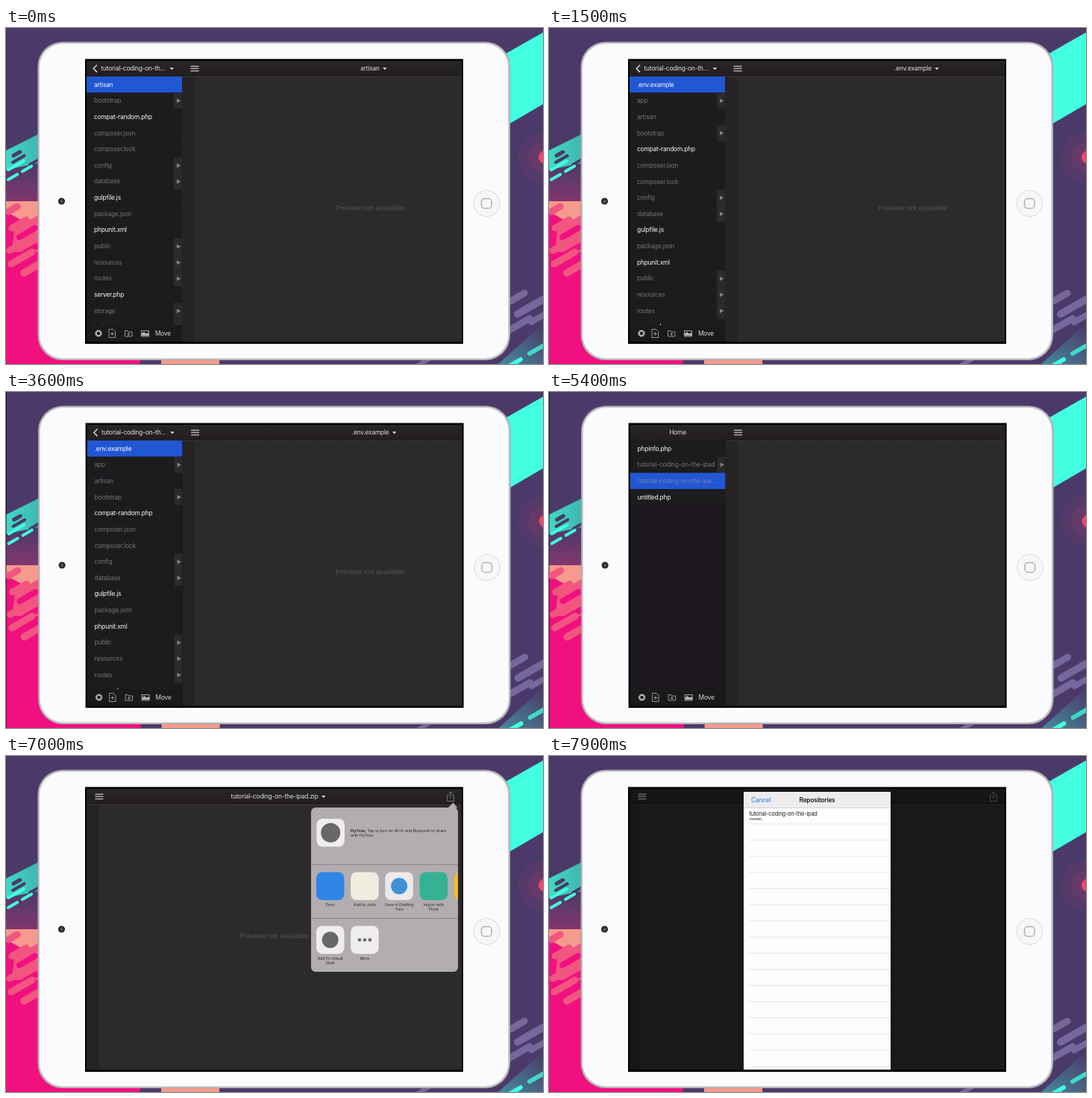
Write an HTML page that moves like this. It is 720 by 450 pixels and loops after 8000 ms.

```html
<!DOCTYPE html>
<html lang="en">
<head>
<meta charset="utf-8">
<title>Tablet file manager</title>
<style>
html, body { margin: 0; width: 100%; height: 100%; overflow: hidden; background: #000; }
svg { display: block; width: 720px; height: 450px; }
text { font-family: Inter, "Noto Sans", sans-serif; font-size: 8.37px; letter-spacing: -.2px; white-space: pre; }
.plain { font-family: "Liberation Sans", Arial, sans-serif; font-size: 9.8px; letter-spacing: 0; }
.tiny { font-size: 5.2px; letter-spacing: 0; }
.mid { text-anchor: middle; }
</style>
</head>
<body>
<svg id="svg" viewBox="0 0 720 450" xmlns="http://www.w3.org/2000/svg">
  <defs>
    <clipPath id="screen"><rect x="108" y="44" width="503" height="376"/></clipPath>
    <clipPath id="list"><rect x="108" y="65" width="128" height="333"/></clipPath>
    <clipPath id="share"><rect x="409" y="69" width="197" height="220" rx="6"/></clipPath>
    <linearGradient id="dusk" x1="0" y1="0" x2="0" y2="1">
      <stop offset="0" stop-color="#4b3a69"/><stop offset="1" stop-color="#84366f"/>
    </linearGradient>
    <linearGradient id="sea" x1="0" y1="0" x2="1" y2="0">
      <stop offset="0" stop-color="#3fd9c4"/><stop offset="1" stop-color="#3fb3b0"/>
    </linearGradient>
    <linearGradient id="deep" x1="1" y1="0" x2="0" y2="1">
      <stop offset="0" stop-color="#4b3a69"/><stop offset="1" stop-color="#448a9c"/>
    </linearGradient>
    <linearGradient id="bar" x1="0" y1="0" x2="0" y2="1">
      <stop offset="0" stop-color="#282527"/><stop offset="1" stop-color="#221e20"/>
    </linearGradient>
  </defs>
  <g id="stage">
    <g id="backdrop"></g>
    <g id="tablet"></g>
    <g id="view" clip-path="url(#screen)"></g>
  </g>
</svg>
<script>
const LOOP = 8000, STEP = 100, ROW = 21.65, SIDE = 128;
const FOLDER = 'tutorial-coding-on-the-ipad';
const get = id => document.getElementById(id);
const pen = document.createElement('canvas').getContext('2d');

const rect = (x, y, w, h, fill, more = '') =>
  `<rect x="${x}" y="${y}" width="${w}" height="${h}" fill="${fill}" ${more}/>`;
const circle = (x, y, r, fill, more = '') =>
  `<circle cx="${x}" cy="${y}" r="${r}" fill="${fill}" ${more}/>`;
const path = (d, fill, more = '') => `<path d="${d}" fill="${fill}" ${more}/>`;
const line = (d, color, width = 1, more = '') =>
  path(d, 'none', `stroke="${color}" stroke-width="${width}" ${more}`);
const text = (x, y, s, fill, cls = '', more = '') =>
  `<text x="${x}" y="${y}" fill="${fill}" class="${cls}" ${more}>${s}</text>`;
const group = (body, more) => `<g ${more}>${body}</g>`;
const move = (x, y, body) => group(body, `transform="translate(${x} ${y})"`);
// slanted round-ended bar
const pill = (x, y, len, width, color) =>
  line(`M${x} ${y}l${len * .87} ${-len * .5}`, color, width, 'stroke-linecap="round"');
const caret = (x, color = '#d5d3d5') => path(`M${x} 53h5.4l-2.7 3.2z`, color);

// piecewise linear value through [time, value] pairs
function track(t, ...keys) {
  if (t <= keys[0][0]) return keys[0][1];
  for (let i = 1; i < keys.length; i++) {
    const [a, u] = keys[i - 1], [b, v] = keys[i];
    if (t <= b) return u + (v - u) * (t - a) / (b - a);
  }
  return keys[keys.length - 1][1];
}

function textWidth(s) {
  pen.font = '8.37px Inter, "Noto Sans", sans-serif';
  return pen.measureText(s).width - .2 * s.length;
}

function backdrop() {
  const night = '#4b3a69', pink = '#f0107f', rose = '#f2557f', peach = '#f59a8c';
  const mint = '#42ffe0', lilac = '#76679c';
  return rect(0, 0, 720, 450, night) +
    rect(0, 182, 60, 52, 'url(#dusk)') +
    path('M0 164L48 140V180L0 190z', 'url(#sea)') +
    pill(10, 171, 10, 5, night) + pill(9, 180, 18, 4, night) + pill(32, 183, 16, 4, night) +
    pill(3, 190, 24, 4, mint) + pill(3, 203, 14, 4, mint) + pill(22, 192, 14, 4, mint) +
    path('M0 232H60V436H180V450H0z', pink) +
    path('M12 262L45 244V300L8 300z', rose) +
    path('M0 232H45V247L22 258L0 246z', peach) +
    pill(3, 246, 14, 9, rose) + pill(28, 254, 16, 9, peach) + pill(8, 268, 22, 9, rose) +
    pill(18, 280, 24, 8, pink) + pill(5, 298, 36, 9, rose) + pill(24, 302, 20, 8, pink) +
    pill(7, 316, 32, 9, rose) + pill(24, 328, 24, 10, rose) +
    rect(208, 444, 78, 6, peach) +
    path('M660 40L720 6V102L660 137z', mint) +
    circle(720, 173, 34, '#553a69') + circle(720, 173, 20, '#653a69') +
    circle(723, 173, 9, '#f2456f') +
    path('M660 450L720 396V450z', 'url(#deep)') +
    pill(676, 366, 22, 9, lilac) + pill(686, 383, 38, 10, lilac) +
    pill(676, 404, 30, 9, lilac) + pill(704, 394, 22, 8, lilac) +
    pill(676, 452, 16, 6, mint) + pill(702, 436, 30, 6, '#3fd9c4') + pill(552, 452, 30, 6, lilac);
}

function tablet() {
  return rect(42.5, 18.5, 633.5, 426.5, '#adacaf', 'rx="33"') +
    rect(44, 20, 630.5, 423.5, '#cfced1', 'rx="32"') +
    rect(45.2, 21.2, 628, 421, '#fbfafc', 'rx="31"') +
    circle(74.5, 232, 4.6, '#2c2b30') + circle(74.5, 232, 2, '#55545c') +
    circle(644.5, 235, 17.5, '#f7f6f8', 'stroke="#d9d8da"') +
    rect(637.5, 228.5, 13.5, 13, 'none', 'rx="4" stroke="#b2b1b4" stroke-width="1.5"') +
    rect(106, 41.5, 507, 381.5, '#000');
}

const folderItems = ('.env.example app/ artisan bootstrap/ compat-random.php composer.json composer.lock ' +
  'config/ database/ gulpfile.js package.json phpunit.xml public/ resources/ routes/ server.php storage/ tests/').split(' ');

function rows(items, selected, dimSelected) {
  return items.map((item, i) => {
    const y = 65 + i * ROW, dir = item.endsWith('/'), on = i === selected;
    const bright = /\.(php|js|xml)$/.test(item) || on && !dimSelected;
    return rect(108, y, SIDE, ROW + .1, on ? '#2157d3' : '#1c1b1e') +
      (dir ? rect(225, y, 11, ROW + .1, '#2b2a2d') + path(`M229 ${y + 7.9}l5.2 3-5.2 3z`, '#858386') : '') +
      text(118, y + 13.6, item.replace('/', ''), bright ? '#fafafa' : on ? '#7284ad' : '#757377');
  }).join('');
}

function toolbar() {
  const c = '#b5b3b5', s = `stroke="${c}"`;
  return rect(108, 398, SIDE, 22, '#1b191b') +
    circle(124, 409, 3.3, 'none', `${s} stroke-width="2"`) +
    circle(124, 409, 4.4, 'none', `${s} stroke-dasharray="1.5 1.95"`) +
    line('M138 403.5h5.5l3 3v8h-8.5zM142.3 407v5M140 409.5h5', c, .8) +
    line('M159.5 405.5h3.5l1 1.5h5v6h-9.5zM164.3 408v4M162.3 410h4', c, .8) +
    rect(181.5, 405.5, 10, 7.5, 'none', `${s} stroke-width=".9"`) +
    path('M182 412v-3l3-2 3 2.5 2-1.5 2 2v2z', c) +
    text(200, 412.1, 'Move', '#d8d6d8');
}

function sidebar(t) {
  const pushed = t < 2000
    ? track(t, [200, 1], [300, .55], [400, .15], [500, 0], [600, 0], [700, .08], [800, .6], [900, .92], [1000, 1])
    : track(t, [4500, 1], [4600, .92], [4700, .5], [4800, .15], [4900, 0]);
  const early = t < 600;
  const inFolder = t < 300 || t >= 700 && t < 4700;
  const home = ['phpinfo.php', FOLDER + '/'];
  if (t >= 5100) home.push('tutorial-coding-on-the-ipa…');
  home.push('untitled.php');

  const base = rect(108, 65, SIDE, 333, t < 2000 ? '#141215' : '#1b171c');
  const homeList = move(-SIDE * pushed, 0, base + rows(home, t >= 5400 ? 2 : -1, true));
  const inner = move(0, early ? -2 * ROW : 0, rows(folderItems, early ? 2 : 0));
  const folderList = move(SIDE * (1 - pushed), 0, base + inner);
  const menuOpen = t >= 2300 && t < 3500;
  const head = inFolder
    ? line('M122 49.5l-4.8 4.8 4.8 4.8', '#d5d3d5', 1.5) +
      text(127.5, 57.2, 'tutorial-coding-on-th…', '#e2e0e2') + (menuOpen ? '' : caret(219.7))
    : text(172, 57.2, 'Home', '#dddbdd', 'mid');

  return rect(108, 44, SIDE, 376, '#1b191c') + rect(108, 44, SIDE, 21, 'url(#bar)') + head +
    group(homeList + folderList, 'clip-path="url(#list)"') + toolbar();
}

function editor(t) {
  const title = t < 500 ? 'artisan' : t < 700 ? '' : t < 5400 ? '.env.example'
    : t < 5500 || t >= 7900 ? '' : FOLDER + '.zip';
  const preview = t < 500 || t >= 700 && t < 5400 || t >= 5600 && t < 7900;
  return rect(108, 44, 504, 376, '#2c2a2b') + rect(108, 65, 16.5, 355, '#262325') +
    rect(108, 44, 504, 21, 'url(#bar)') + rect(108, 65, 504, .8, '#3f3c3e') +
    line('M119.5 51.2h11M119.5 54.3h11M119.5 57.4h11', '#aeacae', 1.5) +
    (title ? text(360, 57.2, title, '#dddbdd', 'mid') + caret(364.5 + textWidth(title) / 2) : '') +
    line('M594 52.5h-2.5v8h9v-8h-2.5M596 57v-9M593.6 50.3l2.4-2.5 2.4 2.5', '#7d7b7d', .9) +
    (preview ? text(359.7, 243.6, 'Preview not available', '#575456', 'plain mid') : '');
}

function menu(alpha) {
  const labels = ['Rename', 'Move', 'Zip'].map((s, i) =>
    text(186.5, 82.5 + i * 28.2, s, '#2472df', 'mid', `opacity="${alpha}"`)).join('');
  return group(path('M173 66l7-7.5 7 7.5z', '#e8e6e8') + rect(113, 66, 147, 84.5, '#e8e6e8', 'rx="6"') +
    line('M113 94.2h147M113 122.4h147', '#c8c5c8', .5) + labels, `opacity="${alpha}"`);
}

function sharePanel(alpha) {
  const ink = '#2b2a2b';
  const tile = (x, y, fill, mark = '') => rect(x, y, 37.5, 37.5, fill, 'rx="8"') + mark;
  const label = (x, y, ...lines) =>
    lines.map((s, i) => text(x, y + i * 6.3, s, ink, 'tiny mid')).join('');
  const body = rect(409, 69, 197, 220, '#b1adb0') +
    line('M409 145.5h197M409 217.5h197', '#807d80', .8) +
    tile(416.5, 84, '#efedf0', circle(435.2, 102.8, 13, '#69676a')) +
    text(462, 102, '<tspan font-weight="700">FlyToss.</tspan> Tap to turn on Wi-Fi and Bluetooth to share', ink, 'tiny') +
    text(462, 108.2, 'with FlyToss.', ink, 'tiny') +
    tile(416, 155.5, '#2f86e6') + label(434.7, 201, 'Envo') +
    tile(462.2, 155.5, '#f0ecdf') + label(481, 201, 'Add to Jotts') +
    tile(508.4, 155.5, '#ebe9ec', circle(527.2, 174.2, 11, '#3f92d8')) +
    label(527.2, 201, 'Save in Drafting', 'Tree') +
    tile(554.6, 155.5, '#35b294') + label(573.4, 201, 'Import with', 'Plonk') +
    tile(601, 155.5, '#f0bf2f') + label(608, 201, 'I') +
    tile(416, 227.5, '#efedf0', circle(434.7, 246.2, 11, '#69676a')) +
    label(434.7, 273, 'Add To oVault', 'Shelf') +
    tile(462.2, 227.5, '#efedf0', [-7, 0, 7].map(d => circle(481 + d, 246.2, 2.3, '#69676a')).join('')) +
    label(481, 273, 'More');
  return group(path('M592.5 69.5l7-7 6 7z', '#b1adb0') + group(body, 'clip-path="url(#share)"'), `opacity="${alpha}"`);
}

function sheet(t) {
  const drop = track(t, [7600, 372], [7700, 298], [7800, 80], [7900, 0]);
  const light = track(t, [7700, 0], [7800, .6], [7900, 1]);
  const gray = (a, b) => { const v = Math.round(a + (b - a) * light); return `rgb(${v},${v - 2},${v})`; };
  let lines = '';
  for (let y = 91; y < 420; y += ROW) lines += `M268 ${y.toFixed(2)}H458`;
  return move(0, drop,
    rect(261, 48, 197, 372, gray(127, 255)) + rect(261, 48, 197, 21.5, gray(120, 238)) +
    rect(261, 69.2, 197, .7, gray(108, 200)) + line(lines, gray(116, 224), .8) +
    text(271, 61.6, 'Cancel', light > .5 ? '#2183e2' : '#2d68ad') +
    text(359.5, 61.6, 'Repositories', '#1c1b1e', 'mid', 'font-weight="600"') +
    text(268.5, 79.7, FOLDER, '#222124', '', 'style="font-size:7.4px"') +
    text(268.5, 86.4, 'master,', '#222124', 'tiny'));
}

function draw(t) {
  const nudge = t >= 2600 && t < 6200 ? .6 : 0;
  get('stage').setAttribute('transform', `translate(${nudge} 0)`);

  const slide = SIDE * track(t, [6100, 0], [6200, .12], [6300, .6], [6400, .92], [6500, 1]);
  const menuAlpha = track(t, [2200, 0], [2500, .32], [2600, .65], [2800, .95], [3000, .95], [3200, .6], [3500, 0]);
  const shareAlpha = track(t, [6500, 0], [6600, .25], [6700, .65], [6800, .95], [7000, 1], [7200, 1], [7500, 0]);
  const haze = track(t, [7400, 0], [7600, .25], [7700, .3], [7800, .12], [7900, 0]);
  const shade = track(t, [7700, 0], [7800, .2], [7900, .4]);

  let out = move(SIDE - slide, 0, editor(t));
  if (slide < SIDE) out += move(-slide, 0, sidebar(t));
  if (menuAlpha) out += menu(menuAlpha);
  if (shareAlpha) out += sharePanel(shareAlpha);
  if (haze) out += rect(108, 44, 503, 376, '#c8c4c8', `opacity="${haze}"`);
  if (shade) out += rect(108, 44, 503, 376, '#000', `opacity="${shade}"`);
  if (t >= 7700) out += sheet(t);
  get('view').innerHTML = out;
}

get('backdrop').innerHTML = backdrop();
get('tablet').innerHTML = tablet();
const start = performance.now();
let shown = -1;
function tick() {
  const t = Math.floor(((performance.now() - start) % LOOP) / STEP) * STEP;
  if (t !== shown) draw(shown = t);
  requestAnimationFrame(tick);
}
tick();
</script>
</body>
</html>
```
